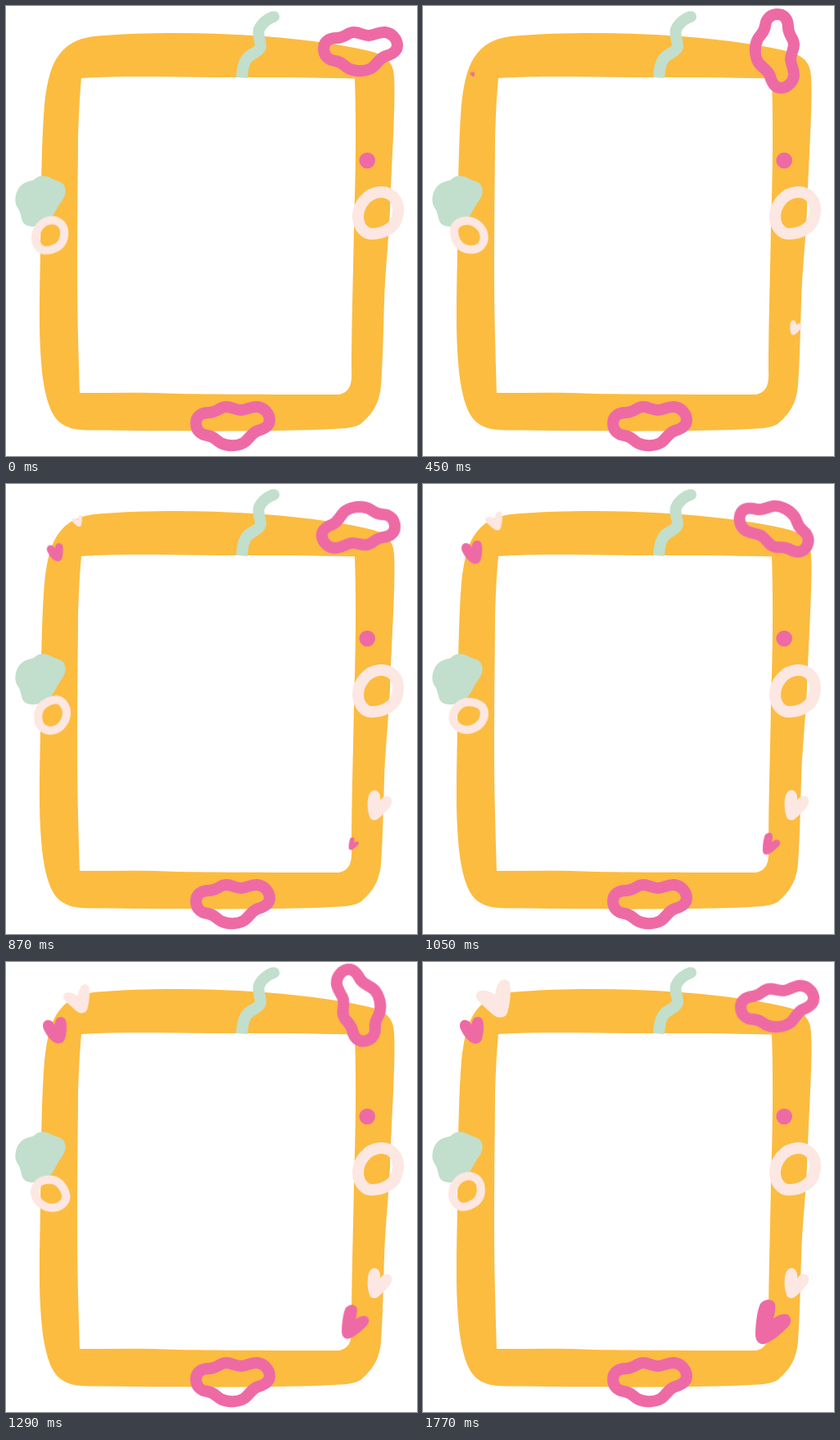
Write an HTML page that moves like this. It is 502 px wide and 549 px high and loops after 1.8 s.

```html
<!DOCTYPE html>
<html lang="en">
<head>
<meta charset="utf-8">
<title>Playful frame</title>
<style>
  html, body { margin: 0; width: 100%; height: 100%; overflow: hidden; background: #fff; }
  svg { display: block; width: 100%; height: 100%; }

  .amber { fill: #fbbc40; }
  .mint { fill: #c1dfcc; }
  .pink { fill: #ee6aa5; }
  .blush { fill: #fde7e2; }
  .line { fill: none; stroke-width: 14; stroke-linecap: butt; stroke-linejoin: round; }
  .line.mint { stroke: #c1dfcc; }
  .line.pink { stroke: #ee6aa5; }
  .line.blush { stroke: #fde7e2; }

  .spin { animation: spin 1.8s steps(60) infinite; }
  .heart { animation: 1.8s cubic-bezier(.37, 0, .63, 1) infinite both; }
  #cloud-top { transform-origin: 431.5px 53.5px; }
  #ring-left { transform-origin: 55px 281px; }
  #heart-a { transform-origin: 454.5px 393px; animation-name: grow-a; }
  #heart-b { transform-origin: 60.5px 83px; animation-name: grow-b; }
  #heart-c { transform-origin: 87px 45.3px; animation-name: grow-c; }
  #heart-d { transform-origin: 423.6px 438.7px; animation-name: grow-d; }

  @keyframes spin { to { transform: rotate(360deg); } }
  /* Each heart grows in its own window, then holds until the loop restarts. */
  @keyframes grow-a { 0% { transform: scale(0); } 51%, 100% { transform: scale(1); } }
  @keyframes grow-b { 0%, 5.3% { transform: scale(0); } 75%, 100% { transform: scale(1); } }
  @keyframes grow-c { 0%, 20% { transform: scale(0); } 97%, 100% { transform: scale(1); } }
  @keyframes grow-d { 0%, 22% { transform: scale(0); } 95.5%, 100% { transform: scale(1); } }
</style>
</head>
<body>
<svg viewBox="0 0 502 549">
  <defs>
    <path id="cloud" d="M388 52C388 44 394 39 404 39C414 39 417 32 425 32C432 32 436 36 443 36
      C450 36 455 31 463 32C472 33 478 41 478 48C478 56 471 59 464 61C455 64 453 72 446 76
      C438 80.5 426 80 418 76C412 72 410 68 402 67C393 66 388 60 388 52Z"/>
    <path id="ring" d="M457 227C470 226 479 236 479 248C479 261 473 269 466 273
      C460 276.5 453 278 447 278C437 278 430 268 430 257C430 243 441 228 457 227Z"/>
  </defs>

  <path class="amber" fill-rule="evenodd" d="M112 36.5C170 32 240 32 300 36C350 39 400 45 440 54
    C462 59 473 66 474 86C476 120 471 190 469 250C467 290 463 325 462 360C461 395 460 440 458 463
    C456 486 447 498 433 510C424 515 412 515.5 400 516C360 518 330 518 290 518.5C230 519 160 518 100 517.5
    C82 517 64 515 54 491C46 471 43 445 41.5 410C40 370 42 320 42 290C43 230 43 170 47 120
    C50 92 55 71 66 58C78 43 94 38 112 36.5Z
    M92 88C150 85 200 87 260 87C320 87 370 87 426 88.5C428 150 427 200 425 270C424 330 422 390 422 445
    C423 463 419 471 407 474C340 474 270 474 210 473C170 471 130 472 90 472
    C89 430 87 390 87 320C87 250 88 200 88 160C89 130 90 110 92 88Z"/>

  <path class="line mint" d="M288 87.5C289 76 290 68 296 62C302 57 311 55 311 48
    C311 42 307 36 309 29C312 21 320 15 327 13"/>
  <circle class="mint" cx="327.3" cy="13" r="6.8"/>
  <path class="mint" d="M34 212C39 206 48 206 55 210C61 214 68 213 71 219C75 227 71 234 66 241
    C61 248 59 256 52 262C45 269 32 271 24 267C18 263 19 255 16 249C13 244 10 240 12 231
    C14 222 19 217 26 214.5C29 213.5 32 213 34 212Z"/>

  <circle class="pink" cx="441.2" cy="188.5" r="9.8"/>
  <use class="line blush" href="#ring"/>
  <g id="ring-left" class="spin">
    <use class="line blush" href="#ring" transform="translate(-273.7 97.9) scale(.72)"/>
  </g>

  <use class="line pink" href="#cloud" x="-156" y="457"/>
  <g id="cloud-top" class="spin"><use class="line pink" href="#cloud"/></g>

  <path id="heart-a" class="heart blush" d="M457 386C458 379 455 373 449.5 373.5C444 374 442 381 441.7 388
    C441 396 443 404 445 408C448 411 453 410.5 455 408C461 403 467 397 470 392
    C473 387 471 382 467 381C462 380 459 383 457 386Z"/>
  <path id="heart-b" class="heart pink" d="M59 77C58 72 53 70 49 71C44 73 44 79 47 84C50 90 55 96 59 98
    C63 101 70 100 72 94C74 87 75 77 73 71C71 66 65 66 62 69C60 71 60 74 59 77Z"/>
  <path id="heart-c" class="heart blush" d="M88 40C83 36 76 34 70 35C64 37 63 43 67 47C73 53 81 61 88 66
    C94 69 101 68 103 62C106 52 108 37 106 26C104 20 96 20 93 25C90 29 89 34 88 40Z"/>
  <path id="heart-d" class="heart pink" d="M428 435C430 428 431 422 430 417C427 410 417 411 412 417
    C408 425 406 443 406 454C406 462 410 467 417 466C427 463 438 453 446 445
    C452 438 449 429.5 442 429.5C436 429.5 432 432 428 435Z"/>
</svg>
</body>
</html>
```
